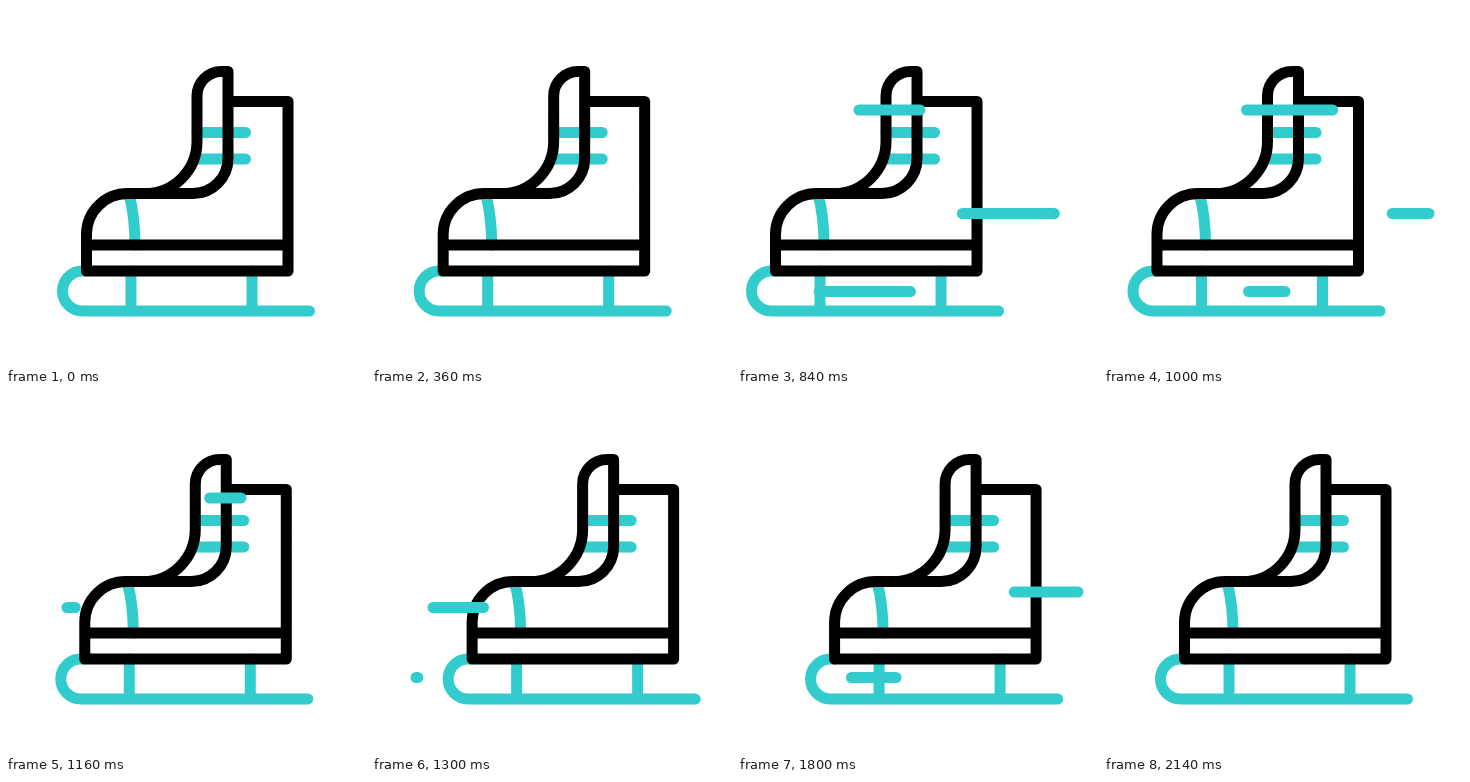
These frames come from a looping animation (360x360 px, 2400 ms). An HTML page with a canvas:

```html
<!DOCTYPE html>
<html lang="en">
<head>
<meta charset="utf-8">
<title>Ice skate</title>
<style>
html, body { margin: 0; width: 100%; height: 100%; overflow: hidden; background: #fff; }
canvas { display: block; width: 360px; height: 360px; }
</style>
</head>
<body>
<canvas id="stage"></canvas>
<script>
const LOOP = 2400, TEAL = '#33cccc', BLACK = '#000';
const canvas = document.getElementById('stage');
const ctx = canvas.getContext('2d');
const dpr = window.devicePixelRatio || 1;
canvas.width = canvas.height = Math.round(360 * dpr);

// Skate position: [time, offset]
const slide = [[175, 0], [800, -43.8], [1470, 31.6], [2140, 0]];

// Speed streaks: y, left end, right end, start time
const streaks = [
  [207.5, 205, 325, 440],
  [285.5, 62, 181, 440],
  [104, 121, 235, 590],
  [213.5, 61, 178, 1083],
  [283.5, 44, 158, 1265],
  [198, 224, 340, 1310]
];
const HEAD = 480, LAG = 293, TAIL = 424;

const teal = new Path2D(
  'M191 126.5H239.5 M188 153H239.5 ' +
  'M123 188C127 203 129 220 129 239 ' +
  'M80 265H76.5a20 20 0 0 0 0 40H303.5 M125 265V305 M246 265V305');

const black = new Path2D(
  'M80.5 239H282 M222 95.5H282V265H80.5V228A41 41 0 0 1 121.5 187.5H187' +
  'A35 35 0 0 0 222 152.5V65.5H215.5A24.5 24.5 0 0 0 191 90V135.5' +
  'A52 52 0 0 1 139 187.5');

function ease(t, start, length) {
  const p = Math.min(1, Math.max(0, (t - start) / length));
  return p * p * (3 - 2 * p);
}

function offset(t) {
  let x = 0;
  for (let i = 1; i < slide.length; i++) {
    const [t0, x0] = slide[i - 1], [t1, x1] = slide[i];
    x += (x1 - x0) * ease(t, t0, t1 - t0);
  }
  return x;
}

function stroke(path, color) {
  ctx.strokeStyle = color;
  ctx.stroke(path);
}

function drawStreak(t, [y, left, right, start]) {
  const head = ease(t, start, HEAD), tail = ease(t, start + LAG, TAIL);
  if (head - tail < 0.002) return;
  const path = new Path2D();
  path.moveTo(left + (right - left) * tail, y);
  path.lineTo(left + (right - left) * head, y);
  stroke(path, TEAL);
}

function draw(t) {
  ctx.setTransform(dpr, 0, 0, dpr, 0, 0);
  ctx.fillStyle = '#fff';
  ctx.fillRect(0, 0, 360, 360);
  ctx.lineWidth = 11;
  ctx.lineCap = ctx.lineJoin = 'round';
  ctx.save();
  ctx.translate(offset(t), 0);
  stroke(teal, TEAL);
  stroke(black, BLACK);
  ctx.restore();
  streaks.forEach(s => drawStreak(t, s));
}

const begin = performance.now();
function tick() {
  draw((performance.now() - begin) % LOOP);
  requestAnimationFrame(tick);
}
tick();
</script>
</body>
</html>
```
